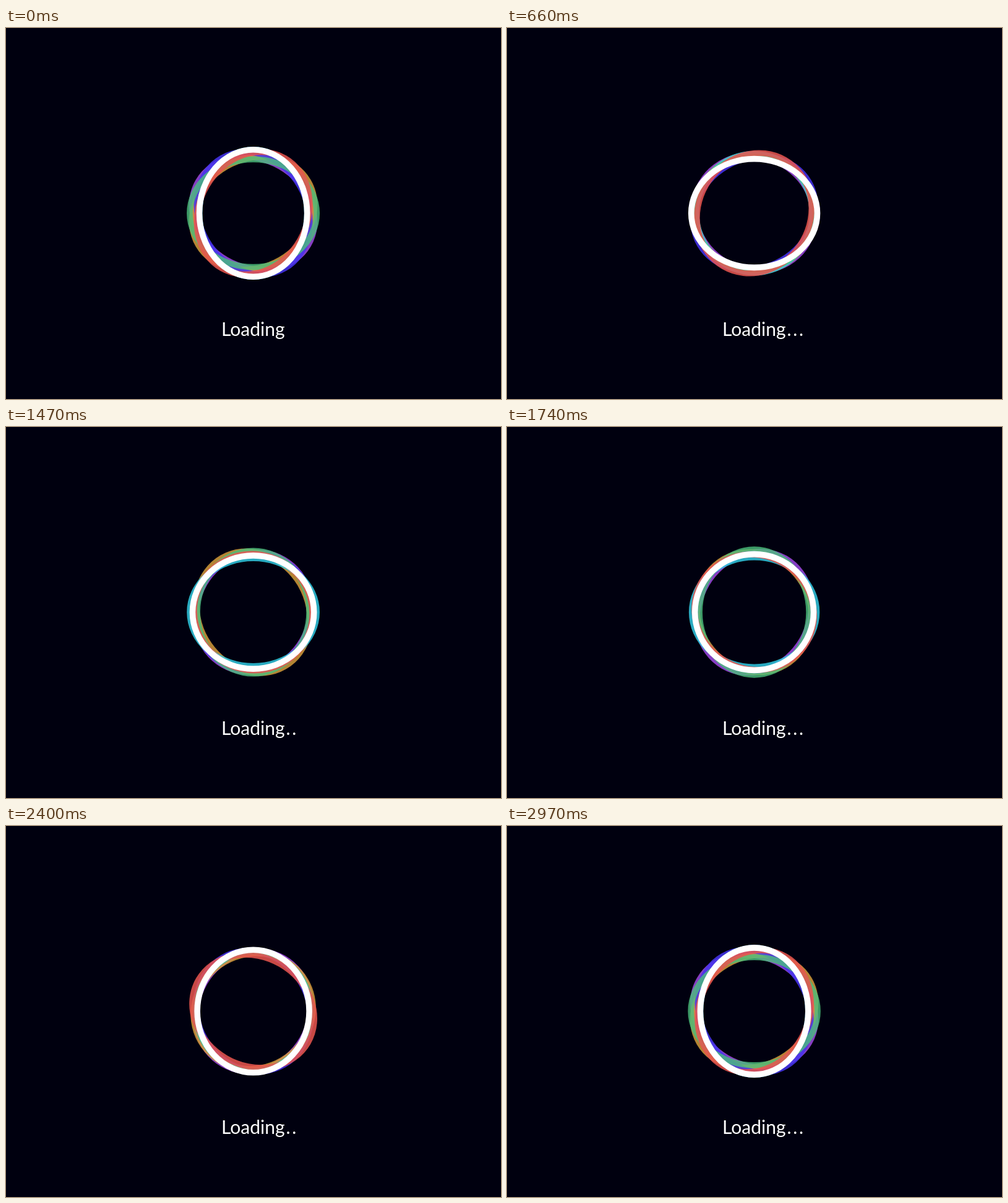
An HTML page that plays this animation: 800x600 px, repeating every 3000 ms.

```html
<!DOCTYPE html>
<html lang="en">
<head>
<meta charset="utf-8">
<title>Loading</title>
<style>
  html, body { margin: 0; width: 100%; height: 100%; overflow: hidden; background: #00000f; }
  svg { display: block; width: 800px; height: 600px; }
  ellipse { fill: none; stroke-width: 9.6; }
  text { font: 30px Lato, "Open Sans", sans-serif; fill: #fff; }
  #dots { letter-spacing: 2.6px; }
</style>
</head>
<body>
<svg viewBox="0 0 800 600">
  <g id="rings" transform="translate(399.6 299.5)"></g>
  <text x="348" y="498">Loading<tspan id="dots" dx="2"></tspan></text>
</svg>
<script>
const LOOP = 3000, RADIUS = 94.9, SQUASH = 7.8;

// Bottom to top: colour, tilt in degrees, time of the opposite squash, opacity
const rings = [
  ['#9c48e0', 120, 2150, .86],
  ['#d29a3a', 60, 1250, .86],
  ['#4634ee', 150, 410, .86],
  ['#30c6de', 0, 1500, .86],
  ['#4cc07c', 90, 2000, .8],
  ['#e8564e', 30, 2600, .86],
  ['#ffffff', 0, 720, 1]
].map(([color, tilt, turn, opacity]) => {
  const el = document.createElementNS('http://www.w3.org/2000/svg', 'ellipse');
  el.setAttribute('stroke', color);
  el.setAttribute('stroke-opacity', opacity);
  el.setAttribute('transform', `rotate(${tilt})`);
  document.getElementById('rings').append(el);
  return { el, turn };
});
const dots = document.getElementById('dots');

// Halfway between linear and smoothstep
const ease = p => (p + p * p * (3 - 2 * p)) / 2;

function squash(t, turn) {
  const p = t < turn ? t / turn : (LOOP - t) / (LOOP - turn);
  return SQUASH * (1 - 2 * ease(p));
}

// The dots step every 250 ms, and the last three stay until the loop ends
const dotCount = t => t >= 2600 ? 3 : Math.floor((t + 150) / 250) % 4;

function draw() {
  const t = performance.now() % LOOP;
  for (const { el, turn } of rings) {
    const s = squash(t, turn);
    el.setAttribute('rx', RADIUS - s);
    el.setAttribute('ry', RADIUS + s);
  }
  dots.textContent = '.'.repeat(dotCount(t));
  requestAnimationFrame(draw);
}
draw();
</script>
</body>
</html>
```
